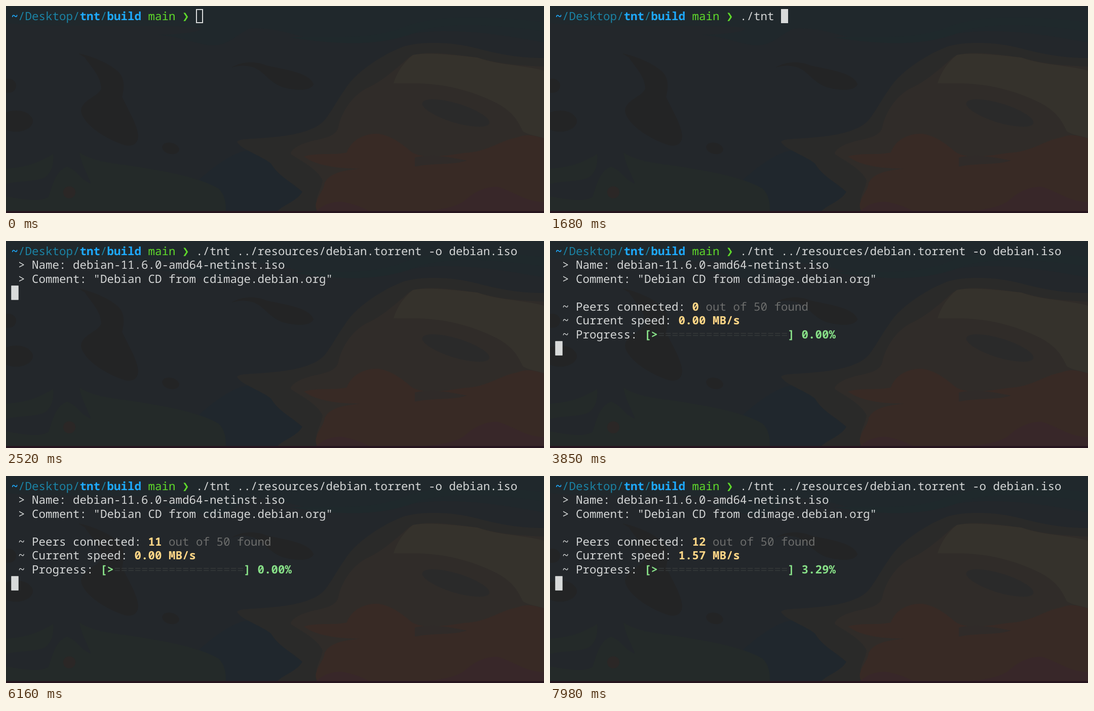
An HTML page for the animation above (8000 ms loop, 1062 by 410 pixels).

```html
<!DOCTYPE html>
<html lang="en">
<head>
<meta charset="utf-8">
<title>Torrent client demo</title>
<style>
  html, body { margin: 0; width: 100%; height: 100%; overflow: hidden; background: #23272b; }
  #stage { position: relative; width: 1062px; height: 410px; overflow: hidden; }
  svg { position: absolute; inset: 0; }
  .row {
    position: absolute; left: 10.4px; top: calc(5.5px + 27.5px * var(--r)); height: 27.5px;
    font: 500 22.5px/27.5px "Noto Sans Mono", "DejaVu Sans Mono", monospace;
    font-variant-ligatures: none; text-rendering: geometricPrecision;
    white-space: pre; color: #d5d7d7;
  }
  b { font-weight: 700; }
  .path { color: #1b83a5; }
  .path b { color: #1eaaff; }
  .branch { color: #5fd92b; }
  .arrow { position: absolute; left: 337.5px; width: 13.5px; text-align: center; font-style: normal; font-weight: 700; }
  .warm { color: #ffd787; }
  .dim { color: #6c6d6c; }
  .green { color: #87df87; }
  .track { color: #343738; }
  #cursor {
    position: absolute; left: 0; top: 0; width: 13.5px; height: 28px; box-sizing: border-box;
    border: 2px solid #d8dada; background: #d8dada;
  }
  #cursor.hollow { background: none; }
</style>
</head>
<body>
<div id="stage">
  <svg width="1062" height="410" viewBox="0 0 1062 410">
    <rect width="1062" height="410" fill="#23272b"/>
    <!-- upper sky and lower water -->
    <path fill="#20282c" d="M0 0H1062V72C990 60 930 48 850 50C770 54 720 76 650 72C580 66 540 40 480 45C450 60 440 78 405 78C370 74 350 62 300 57C350 56 400 50 380 42C280 36 120 44 0 34Z"/>
    <path fill="#1f292c" d="M560 62C650 58 720 70 790 40C850 18 940 18 1062 32V50C960 36 880 32 820 48C750 78 670 80 560 62Z"/>
    <path fill="#20272d" d="M380 345C430 300 470 280 490 288C530 310 545 340 585 368C575 385 555 395 535 406H434C432 380 420 365 380 345Z"/>
    <!-- dark patches -->
    <g fill="#232425">
      <path d="M143 94C165 98 200 112 215 125C232 136 236 154 229 180C240 205 259 232 261 258C260 276 246 280 229 274C190 260 151 232 148 207C151 185 181 180 188 164C188 138 165 118 156 102Z"/>
      <path d="M445 122C465 110 490 108 515 118C550 126 600 132 607 155C602 168 575 169 547 161C520 152 512 132 490 122C472 116 460 118 445 122Z"/>
      <ellipse cx="20" cy="228" rx="33" ry="21"/>
      <ellipse cx="4" cy="158" rx="16" ry="14"/>
      <ellipse cx="325" cy="282" rx="17" ry="11" transform="rotate(14 325 282)"/>
    </g>
    <!-- green ground -->
    <g fill="#242a29">
      <path d="M0 322C40 320 70 308 93 293C95 310 91 330 76 340C50 350 25 345 0 353Z"/>
      <path d="M145 290C175 312 230 312 280 322C340 332 390 344 420 362C432 374 434 390 434 406H0V377C30 382 65 390 84 378C92 355 98 325 121 318C140 325 148 345 168 352C160 330 148 312 145 290Z"/>
    </g>
    <circle cx="125" cy="369" r="12" fill="#2b2726"/>
    <!-- rock -->
    <path fill="#2a2a29" d="M1062 103C1010 104 960 92 930 84C880 70 820 70 785 80C745 96 705 122 680 150C660 176 645 205 632 222C612 250 560 258 500 262C480 264 462 262 456 269C465 285 500 294 523 312C540 340 567 350 585 368C575 386 548 394 536 406H1062Z"/>
    <path fill="#302c29" d="M1062 120C1010 118 970 114 930 102C880 96 820 86 795 102C770 124 745 148 710 164C680 180 660 216 656 240C650 262 620 262 595 270C574 276 562 286 562 293C580 306 612 320 625 345C622 368 606 380 616 406H1062Z"/>
    <path fill="#35322c" d="M765 153C772 130 785 112 803 97C835 91 880 97 930 102C975 118 1015 116 1062 128V262C1045 256 1030 255 1020 248C1010 226 1000 210 970 193C930 172 880 158 840 155C812 152 790 154 765 153Z"/>
    <ellipse cx="888" cy="212" rx="69" ry="19" transform="rotate(17 888 212)" fill="#2a2a2a"/>
    <path fill="#382a25" d="M588 298C615 290 650 296 673 290C680 268 704 252 735 253C765 258 782 274 803 291C830 304 870 296 905 291C955 288 970 268 1010 260C1030 252 1045 258 1062 262V406H614C604 386 628 368 629 350C640 330 665 326 700 322C660 322 615 318 588 298Z"/>
    <path fill="#302b29" d="M807 300C840 292 880 300 910 306C880 316 850 310 807 318Z"/>
    <g fill="#382729">
      <path d="M612 406C625 394 645 386 665 388C685 392 700 397 716 406Z"/>
      <path d="M830 406C870 402 890 396 905 386C925 366 950 357 970 358C1000 366 1025 388 1062 388V406Z"/>
    </g>
    <rect y="406" width="1062" height="4" fill="#26151f"/>
  </svg>

  <div class="row" style="--r:0"><span class="path"><b>~</b>/Desktop/<b>tnt</b>/<b>build</b></span><span class="branch"> main <i class="arrow">❯</i></span>  <span id="command"></span></div>
  <div id="info">
    <div class="row" style="--r:1"> &gt; Name: debian-11.6.0-amd64-netinst.iso</div>
    <div class="row" style="--r:2"> &gt; Comment: "Debian CD from cdimage.debian.org"</div>
  </div>
  <div id="stats">
    <div class="row" style="--r:4"> ~ Peers connected: <b class="warm" id="peers"></b><span class="dim"> out of 50 found</span></div>
    <div class="row" style="--r:5"> ~ Current speed: <b class="warm"><span id="speed"></span> MB/s</b></div>
    <div class="row" style="--r:6"> ~ Progress: <b class="green">[&gt;</b><span class="track" id="track"></span><b class="green">] <span id="percent"></span>%</b></div>
  </div>
  <div id="cursor"></div>
</div>
<script>
  const LOOP = 8000, CELL = 13.5, LINE = 27.5, PROMPT = 27;
  const COMMAND = "./tnt ../resources/debian.torrent -o debian.iso";

  // Each track is a list of [start time, value].
  const typed = [[0, 0], [980, 1], [1120, 2], [1330, 3], [1470, 4], [1540, 5], [1680, 6], [1960, COMMAND.length]];
  const cursorRow = [[0, 0], [2450, 1], [2520, 3], [3850, 7]];
  const peers = [[0, 0], [4480, 3], [4830, 6], [5180, 8], [5530, 9], [6160, 11], [6790, 12]];
  const speed = [[0, 0], [7140, 1.57]];
  const percent = [[0, 0], [6510, 0.68], [6650, 1.05], [6930, 1.42], [7140, 1.79],
                   [7350, 2.17], [7560, 2.54], [7770, 2.92], [7980, 3.29]];

  const el = id => document.getElementById(id);
  const at = (track, t) => track.findLast(([start]) => start <= t)[1];
  const setText = (id, text) => { if (el(id).textContent !== text) el(id).textContent = text; };
  const show = (id, on) => { el(id).style.visibility = on ? "visible" : "hidden"; };

  function draw(t) {
    const count = at(typed, t), row = at(cursorRow, t);
    const col = row ? 0 : PROMPT + count;
    setText("command", COMMAND.slice(0, count));
    setText("peers", String(at(peers, t)));
    setText("speed", at(speed, t).toFixed(2));
    setText("percent", at(percent, t).toFixed(2));
    show("info", t >= 2520);
    show("stats", t >= 3850);
    el("cursor").classList.toggle("hollow", t < 350);
    el("cursor").style.transform = `translate(${10.5 + col * CELL}px, ${6 + row * LINE}px)`;
  }

  function tick() {
    draw((performance.now() - begin) % LOOP);
    requestAnimationFrame(tick);
  }

  el("track").textContent = "=".repeat(19);
  const begin = performance.now();
  tick();
</script>
</body>
</html>
```
